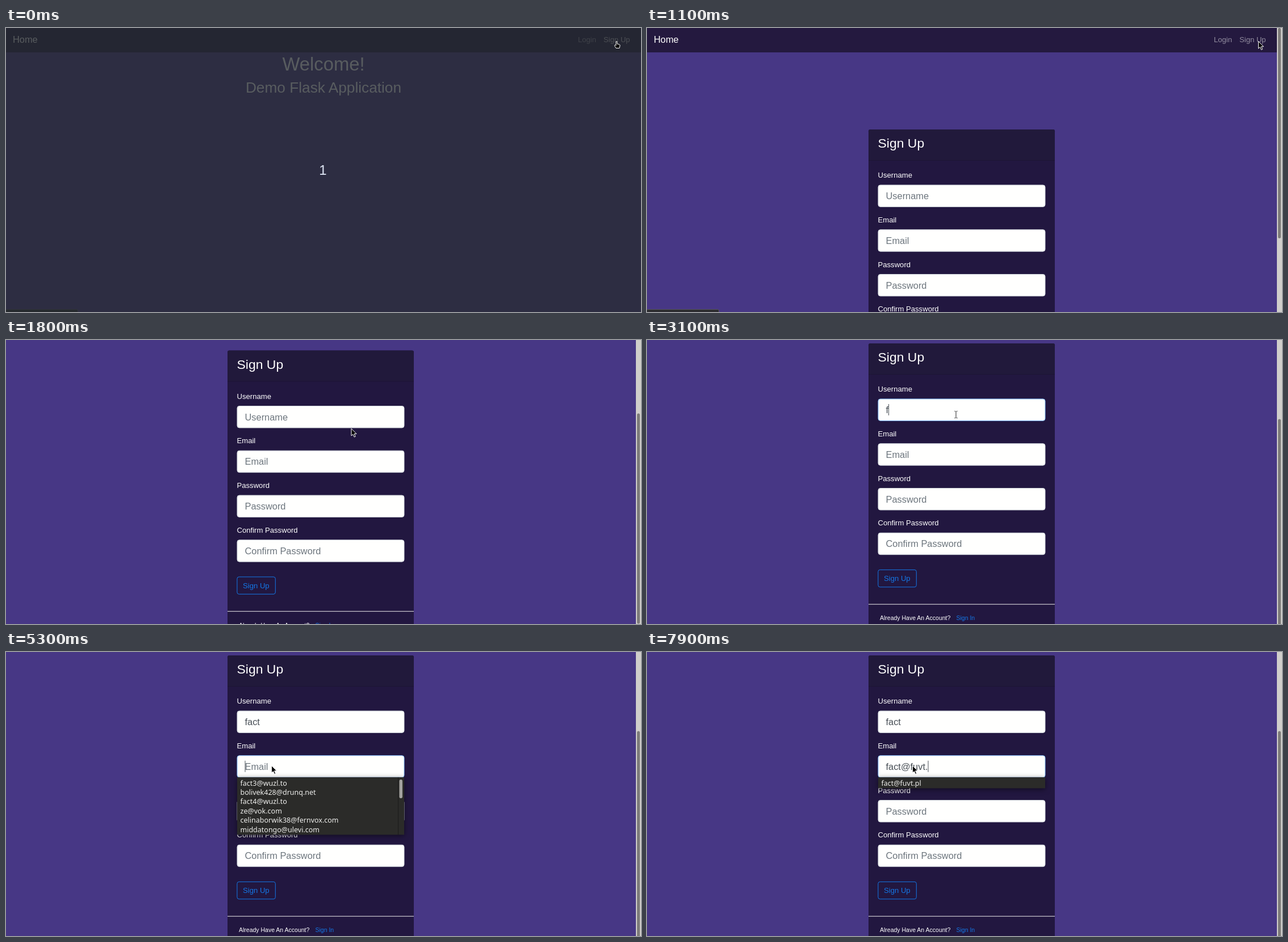
An HTML page for the animation above (8 s loop, 1118 px wide and 501 px high).

```html
<!DOCTYPE html>
<html lang="en">
<head>
<meta charset="utf-8">
<title>Sign up demo</title>
<style>
  html, body { margin: 0; width: 100%; height: 100%; overflow: hidden; background: #473785; }
  svg { display: block; font: 13.12px "Liberation Sans", Arial, sans-serif; fill: #fff; }
  .brand, .value { font-size: 16.4px; }
  .title { font-size: 22.96px; }
  .small { font-size: 10.5px; }
  .value { fill: #495057; }
  .hint { fill: #6c757d; }
  .link { fill: #1477e6; }
  .menu { filter: drop-shadow(0 2px 5px rgba(0, 0, 0, .5)); }
  .menu text { font: 12.5px "Noto Sans", "Open Sans", sans-serif; fill: #eeeeec; }
  .cursor { fill: #000; stroke: #fff; stroke-width: 1; stroke-linejoin: round; }
</style>
</head>
<body>
<svg id="stage" width="1118" height="501">
  <g id="page">
    <rect width="1118" height="43" fill="#24193f"/>
    <text class="brand" x="12" y="26">Home</text>
    <g id="links">
      <text x="1007" y="25" fill-opacity=".5">Login</text>
      <text id="signUp" x="1052" y="25">Sign Up</text>
    </g>
    <g id="home" text-anchor="middle">
      <text x="559" y="75" font-size="32.8">Welcome!</text>
      <text x="559" y="114" font-size="26.24">Demo Flask Application</text>
    </g>
    <g id="form" transform="translate(0 179)">
      <rect x="390" width="328" height="540" rx="3.3" fill="#221740"/>
      <path d="M390 54V3.3Q390 0 393.3 0H714.7Q718 0 718 3.3V54Z" fill="#21193b"/>
      <path d="M390 54.5H718" stroke="#1c1434"/>
      <text class="title" x="406.5" y="32">Sign Up</text>
      <g id="fields"></g>
      <rect x="406.9" y="399.4" width="67.4" height="30.4" rx="3.3" fill="none" stroke="#1477e6"/>
      <text class="link" x="417" y="419">Sign Up</text>
      <path d="M390 460.2H718" stroke="#eee"/>
      <text class="small" x="410" y="488">Already Have An Account?</text>
      <text class="small link" x="544.5" y="488">Sign In</text>
      <rect id="caret" y="107" width="1" height="20" fill="#495057"/>
      <g id="menu" class="menu"></g>
    </g>
  </g>
  <g id="bar">
    <rect x="1109" width="9" height="501" fill="#d0cecb"/>
    <rect id="thumb" x="1111" width="5" height="371" rx="2.5" fill="#7d7b79"/>
  </g>
  <rect id="status" x="-1" y="496.5" width="127.5" height="8" rx="2" fill="#2c2c30" stroke="#58565f"/>
  <g id="countdown">
    <rect width="1118" height="501" fill="rgb(37,42,46)" fill-opacity=".765"/>
    <text x="558" y="259" font-size="24" text-anchor="middle" fill="#dfe6f5">1</text>
  </g>
  <g id="pointer" class="cursor">
    <path id="arrow" d="M.5 .5V13.2L3.4 10.6L5.6 15.4L7.7 14.5L5.6 9.8H9.6Z"/>
    <path id="hand" d="M-1 0Q0-1 1 0V4L5 5Q6 5.500 6 7L5 11.500H-1L-3.500 7.500Q-4 6-2.500 6L-1 7Z"/>
    <g id="beam" fill="none">
      <path d="M-2.500-6H-1L0-5L1-6H2.500M0-5V5M-2.500 6H-1L0 5L1 6H2.500" stroke-width="2.600"/>
      <path d="M-2.500-6H-1L0-5L1-6H2.500M0-5V5M-2.500 6H-1L0 5L1 6H2.500" stroke="#222"/>
    </g>
  </g>
</svg>
<script>
const LOOP = 8000, STEP = 100, PITCH = 78.75, ROW = 16.4;
const $ = id => document.getElementById(id);
const show = (id, on) => $(id).style.display = on ? '' : 'none';
const move = (id, x, y) => $(id).setAttribute('transform', `translate(${x} ${y})`);

// Tracks are [time, ...values]; "held" jumps, "eased" runs straight between keys.
const held = (track, t) => track.filter(k => k[0] <= t).pop().slice(1);
function eased(track, t) {
  const i = track.findIndex(k => k[0] > t);
  if (i < 0) return track[track.length - 1].slice(1);
  const a = track[i - 1], b = track[i], p = (t - a[0]) / (b[0] - a[0]);
  return a.slice(1).map((v, j) => v + (b[j + 1] - v) * p);
}

const people = ['factory', 'FACT', 'fact'];
const mails = ['fact3@wuzl.to', 'bolivek428@drunq.net', 'fact4@wuzl.to', 'ze@vok.com',
  'celinaborwik38@fernvox.com', 'middatongo@ulevi.com'];
const own = 'fact@fuvt.pl';

const scroll = [[0, 0], [1200, 0], [1500, 84], [1700, 148], [1900, 173]];
const path = [[0, 1075, 24], [1000, 1075, 24], [1100, 1076, 23], [1200, 1076, 23], [1500, 699, 152],
  [1900, 577, 157], [2000, 577, 157], [2100, 548, 145], [2200, 548, 145], [2300, 544, 132],
  [4400, 544, 131], [4700, 320, 150], [4800, 320, 150], [5100, 467, 200]];
const shape = [[0, 'hand'], [1100, 'arrow'], [2300, 'beam'], [3300, 'arrow'], [5000, 'beam'], [5300, 'arrow']];
const focus = [[0, -1], [2400, 0], [5300, 1]];
const caretOn = [[0, true], [4000, false], [5300, true], [6000, false], [6100, true]];
const typed = [
  [[0, ''], [3100, 'f'], [3300, 'fac'], [3400, 'fact']],
  [[0, ''], [6100, 'f'], [6300, 'fa'], [6400, 'fac'], [6500, 'fact'], [6700, 'fact@'],
    [7300, 'fact@fu'], [7500, 'fact@fuv'], [7600, 'fact@fuvt'], [7900, 'fact@fuvt.']]
];
const lists = [[0, []], [3300, people], [4800, []], [5300, mails],
  [6800, [mails[0], mails[2], own]], [7600, [own]]];

const labels = ['Username', 'Email', 'Password', 'Confirm Password'];
$('fields').innerHTML = labels.map((name, i) => `<g transform="translate(0 ${i * PITCH})">
  <text x="406.5" y="85">${name}</text>
  <rect id="box${i}" x="407" y="98" width="294" height="38.4" rx="3.8" fill="#fffffe"/>
  <text id="text${i}" x="420.5" y="123"></text></g>`).join('');

let drawn;
function drawMenu(rows, field) {
  if (rows === drawn) return;
  drawn = rows;
  const top = 136.2 + field * PITCH;
  $('menu').innerHTML = !rows.length ? '' :
    `<rect x="407" y="${top}" width="294" height="${3 + ROW * rows.length}" fill="#2b2b29"/>` +
    rows.map((row, i) => `<text x="412.5" y="${top + 14.6 + i * ROW}">${row}</text>`).join('') +
    (rows === mails ? `<path d="M690.5 ${top}v101.4" stroke="#1b1b1a"/>
      <rect x="692.5" y="${top + 4}" width="5.5" height="33" rx="2.7" fill="#a3a29f"/>` : '');
}

function draw(now) {
  const t = Math.floor(now % LOOP / STEP) * STEP;
  const onForm = t >= 800;
  const [y] = eased(scroll, t), [active] = held(focus, t), [kind] = held(shape, t);

  show('countdown', t < 300);
  show('home', !onForm);
  show('form', onForm);
  show('bar', onForm);
  move('page', 0, -y);
  move('links', onForm ? -9 : 0, 0);
  $('signUp').setAttribute('fill-opacity', t < 1100 ? .75 : .5);
  $('thumb').setAttribute('y', y * .807);
  $('status').style.opacity = t < 1300 ? 1 : t < 1600 ? .3 : 0;

  labels.forEach((name, i) => {
    const value = typed[i] ? held(typed[i], t)[0] : '', text = $('text' + i);
    text.textContent = value || name;
    text.setAttribute('class', value ? 'value' : 'value hint');
    $('box' + i).setAttribute('stroke', i === active ? '#80bdff' : '#ced4da');
  });

  show('caret', active >= 0 && held(caretOn, t)[0]);
  if (active >= 0) {
    const width = held(typed[active], t)[0] ? $('text' + active).getComputedTextLength() : 0;
    move('caret', 420.5 + width, active * PITCH);
  }
  drawMenu(held(lists, t)[0], Math.max(active, 0));

  for (const id of ['arrow', 'hand', 'beam']) show(id, id === kind);
  move('pointer', ...eased(path, t));
}

const start = performance.now();
function tick() {
  draw(performance.now() - start);
  requestAnimationFrame(tick);
}
tick();
</script>
</body>
</html>
```
